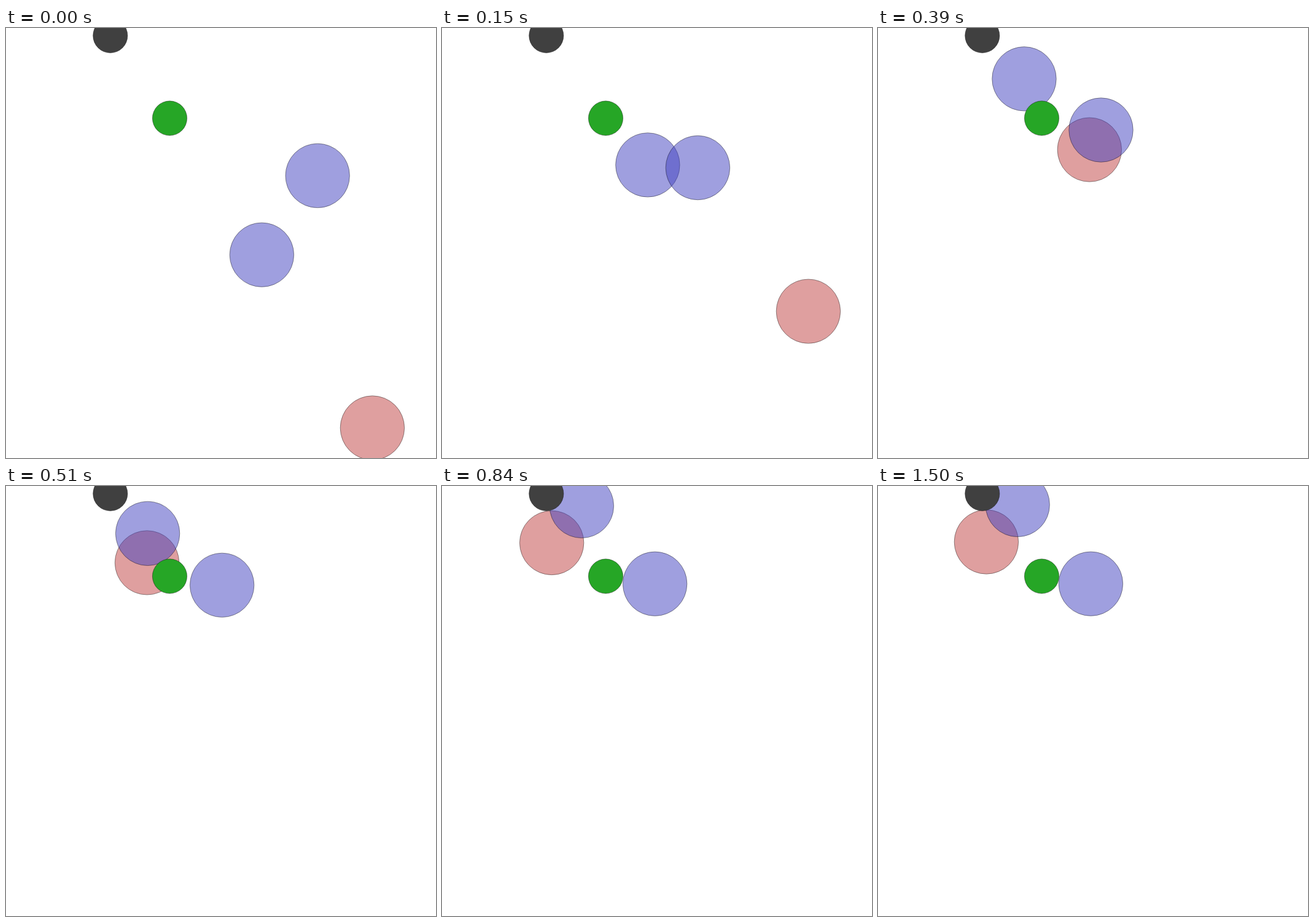
These frames come from a looping animation (700x700 px, 1530 ms). An HTML page:

```html
<!DOCTYPE html>
<html lang="en">
<head>
<meta charset="utf-8">
<title>Grid walkers</title>
<style>
  html, body { margin: 0; width: 100%; height: 100%; overflow: hidden; background: #fff; }
  svg { display: block; width: 100vw; height: 100vh; }
  circle { stroke: #000; stroke-opacity: .45; stroke-width: .9; }
  .agent { fill-opacity: .5; }
</style>
</head>
<body>
<svg id="stage" viewBox="0 0 700 700"></svg>
<script>
const TICK = 30, TICKS = 51, CELL = 70, EASE = 0.25;
const RED = '#bf4040', BLUE = '#4040bf';
const DIRS = { u: [0, -1], d: [0, 1], l: [-1, 0], r: [1, 0] };

// One letter per tick; a dot means the walker waits.
const agents = [
  { x: 596.4, y: 651, fill: RED, path: 'uuuuulllluuull' },
  { x: 507.2, y: 240.4, fill: BLUE, path: 'lllluuuu.dd.....u' },
  { x: 416.4, y: 369.2, fill: BLUE, path: 'uuu.....l' }
];
const markers = [
  { x: 169.8, y: 12.4, fill: '#404040' },
  { x: 266.5, y: 146.9, fill: '#26a626' }
];

const stage = document.getElementById('stage');

function addCircle({ x, y, fill }, r, cls) {
  const el = document.createElementNS(stage.namespaceURI, 'circle');
  const attrs = { cx: x, cy: y, r, fill, class: cls };
  for (const key in attrs) el.setAttribute(key, attrs[key]);
  return stage.appendChild(el);
}

for (const a of agents) a.el = addCircle(a, 52.2, 'agent');
for (const m of markers) addCircle(m, 28.1, 'marker');

// Each hop shifts the goal by one cell, and the circle closes a fixed share of the gap per tick.
function place(agent, tick) {
  let { x, y } = agent;
  [...agent.path].slice(0, tick).forEach((step, i) => {
    const [dx, dy] = DIRS[step] || [0, 0];
    const shift = CELL * (1 - (1 - EASE) ** (tick - i));
    x += dx * shift;
    y += dy * shift;
  });
  agent.el.setAttribute('cx', x);
  agent.el.setAttribute('cy', y);
}

const start = performance.now();
function draw() {
  const tick = Math.floor((performance.now() - start) / TICK) % TICKS;
  for (const a of agents) place(a, tick);
  requestAnimationFrame(draw);
}
draw();
</script>
</body>
</html>
```
